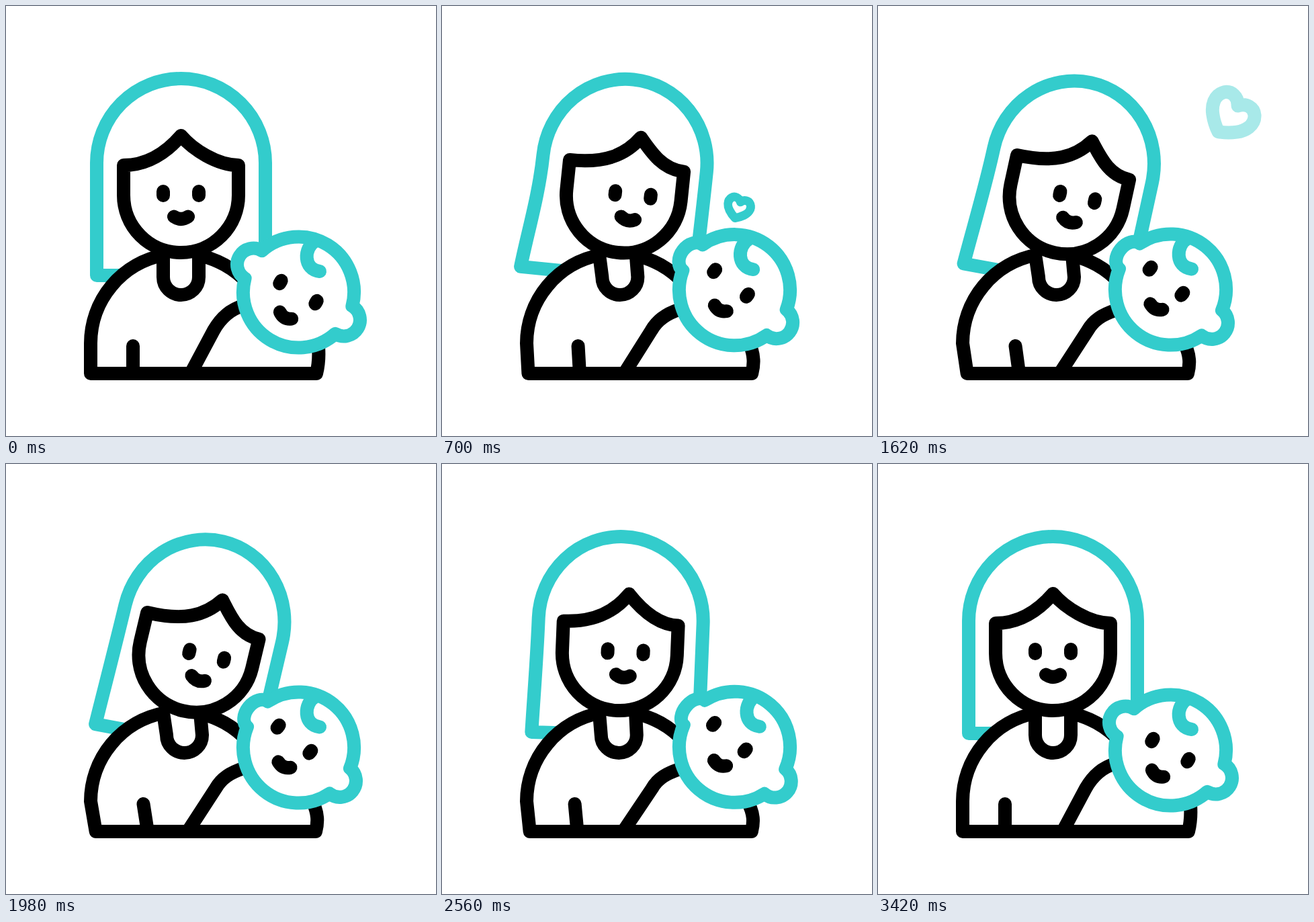
Recreate the animation shown at these times as an HTML page. Size 640 by 640 pixels, loop 3500 ms.

```html
<!DOCTYPE html>
<html lang="en">
<head>
<meta charset="utf-8">
<title>Mother and baby</title>
<style>
  html, body { margin: 0; width: 100%; height: 100%; overflow: hidden; background: #fff; }
  svg { display: block; width: 100vw; height: 100vh; }
  path { fill: #fff; stroke: #000; stroke-width: 20; stroke-linecap: round; stroke-linejoin: round; }
  .teal { stroke: #33cccc; }
  .line { fill: none; }
</style>
</head>
<body>
<svg viewBox="0 0 640 640">
  <path id="hair" class="teal"/>
  <path id="body"/>
  <path id="arm" class="line"/>
  <path id="wrap" class="line"/>
  <path id="neck"/>
  <g id="head">
    <path id="face"/>
    <path id="eyes" class="line" d="M-26.5 -102v6M26.5 -102v6"/>
    <path id="mouth" class="line" d="M-10.5 -1.5q10.5 7 21 0"/>
  </g>
  <path id="heart" class="teal line" d="M0 -14C6 -23 17 -24 23 -17C31 -7 25 5 18 12C12 18 6 22 0 25C-6 22 -12 18 -18 12C-25 5 -31 -7 -23 -17C-17 -24 -6 -23 0 -14Z"/>
  <path id="baby" class="teal"/>
  <path id="curl" class="teal line" d="M460 350C443 360 442 392 467 395"/>
  <path id="babyEyes" class="line" d="M-30.5 -2.5v5M30.5 -2.5v5"/>
  <path id="babyMouth" class="line" d="M-10 -1q10 7 20 0"/>
</svg>
<script>
const LOOP = 3500;
const el = {};
document.querySelectorAll('[id]').forEach(n => el[n.id] = n);

const set = (id, name, value) => el[id].setAttribute(name, value);
const place = (id, x, y, angle = 0) => set(id, 'transform', `translate(${x} ${y}) rotate(${angle})`);

const part = (t, a, b) => Math.min(1, Math.max(0, (t - a) / (b - a)));
const ease = (t, a, b) => { const u = part(t, a, b); return u * u * (3 - 2 * u); };
const bump = (t, a, b) => Math.sin(Math.PI * part(t, a, b)) ** 2;

// 0 is upright, 1 is fully bent over the baby
const bend = t => (1 - (1 - part(t, 90, 2000)) ** 1.5) * (1 - ease(t, 2060, 2740));
// The face turns ahead of the tilt and comes back after it
const turning = t => ease(t, 0, 900) - ease(t, 2200, 2980);
// The baby settles at 1 and goes a little past it at both ends of the rest
const nestling = t => ease(t, 0, 1000) - ease(t, 2540, 2900)
  + .2 * (bump(t, 560, 1500) + bump(t, 2200, 2880));

function drawHair(t, tilt, turn) {
  const r = tilt * Math.PI / 180, s = Math.sin(r), c = Math.cos(r);
  const swing = -25 * bump(t, 200, 1880) - 18 * bump(t, 2500, 3380);
  const drop = 16 * bump(t, 1150, 2800);
  const rx = 125.5 - 5.5 * turn - .1 * swing;
  // Point around the neck, in the tilted frame of the head
  const at = (x, y, dx, dy) => [260.5 + x * c - y * s + dx, 378 + x * s + y * c + dy];
  const a = at(-rx, -144.5, .2 * swing, 0), b = at(rx, -144.5, .2 * swing, 0);
  const p = at(-125.5, 23, swing, drop), q = at(rx, 23, .3 * swing, .2 * drop);
  const down = v => [v[0] - 60 * s, v[1] + 60 * c];
  const along = (v, w) => v.map((n, i) => n + .7 * (w[i] - n));
  set('hair', 'd', `M${p}C${along(a, p)} ${down(a)} ${a}`
    + `A${rx} 125.5 ${tilt} 0 1 ${b}C${down(b)} ${along(b, q)} ${q}Z`);
}

function drawFace(tilt, turn) {
  const tip = 19 * turn;
  place('head', 260.5, 378, tilt);
  set('face', 'd', `M-85.5 -141C${-48 + 18 * turn} -141 ${tip - 20} ${-162 + 6 * turn} ${tip} -185`
    + `C${tip + 18} -164 54 -141 85.5 -141V-96.5A85.5 85.5 0 0 1 -85.5 -96.5Z`);
  place('eyes', 15.5 * turn, 0);
  place('mouth', 11 * turn, -63 + turn, 8 * turn);
}

function drawBody(turn, lean, nest) {
  const side = 462 - nest;
  set('body', 'd', `M385 454A134 134 0 0 0 126 502L${126 + 8 * lean} 547H${side}`
    + `C${side + 3} 535 ${side + 5} 520 ${464 - 10 * nest} 498`);
  set('arm', 'd', `M${189 + 15.5 * turn} 506L${189 + 16 * turn + 5 * lean} 540`);
  set('neck', 'd', `M234 370L${234 + 5 * turn} 403.5a26.5 26.5 0 0 0 53 0L${287 + 2 * turn} 370`);
  const knee = 309 + 3 * nest, end = 446 + 7 * nest;
  set('wrap', 'd', `M${277 - 4 * nest} 543L${knee} 483C${knee + 9} 467 ${knee + 23} ${end + 6} 353 ${end}`);
}

function drawBaby(nest) {
  const ear = 24.2, far = ear - 7.5 * nest;
  place('baby', 435.5, 426 - 4 * nest, 31.5 + 7.5 * nest);
  set('baby', 'd', `M78.9 ${ear}A82.5 82.5 0 0 1 -78.9 ${ear}A${far} ${ear} 0 1 1 -78.9 ${-ear}`
    + `A82.5 82.5 0 0 1 78.9 ${-ear}A${ear} ${ear} 0 1 1 78.9 ${ear}Z`);
  place('curl', 26 * nest * (nest - 1), -3.5 * nest);
  place('babyEyes', 435 - 6 * nest, 426 - 16.3 * nest, 29.5 + 9 * nest);
  place('babyMouth', 416 - 2 * nest, 461.5 - 13 * nest, 30 - 5 * nest);
}

function drawHeart(t) {
  const k = (t - 1060) / 560;
  const grow = 1 - (1 - part(t, 480, 1060)) ** 2;
  const size = grow * (1.04 + .2 * Math.max(0, k));
  set('heart', 'opacity', grow > 0 ? 1 - part(t, 1500, 1710) : 0);
  set('heart', 'transform',
    `translate(${474 + 51 * k} ${246.5 - 84 * k}) rotate(${26 + 11 * k}) scale(${size})`);
  el.heart.style.strokeWidth = 20 / Math.max(1, size);
}

function draw(t) {
  const tilt = 13.5 * bend(t), turn = turning(t), nest = nestling(t);
  drawHair(t, tilt, turn);
  drawFace(tilt, turn);
  drawBody(turn, bend(t - 200), nest);
  drawBaby(nest);
  drawHeart(t);
}

const start = performance.now();
function tick(now) {
  draw(Math.max(0, now - start) % LOOP);
  requestAnimationFrame(tick);
}
draw(0);
requestAnimationFrame(tick);
</script>
</body>
</html>
```
